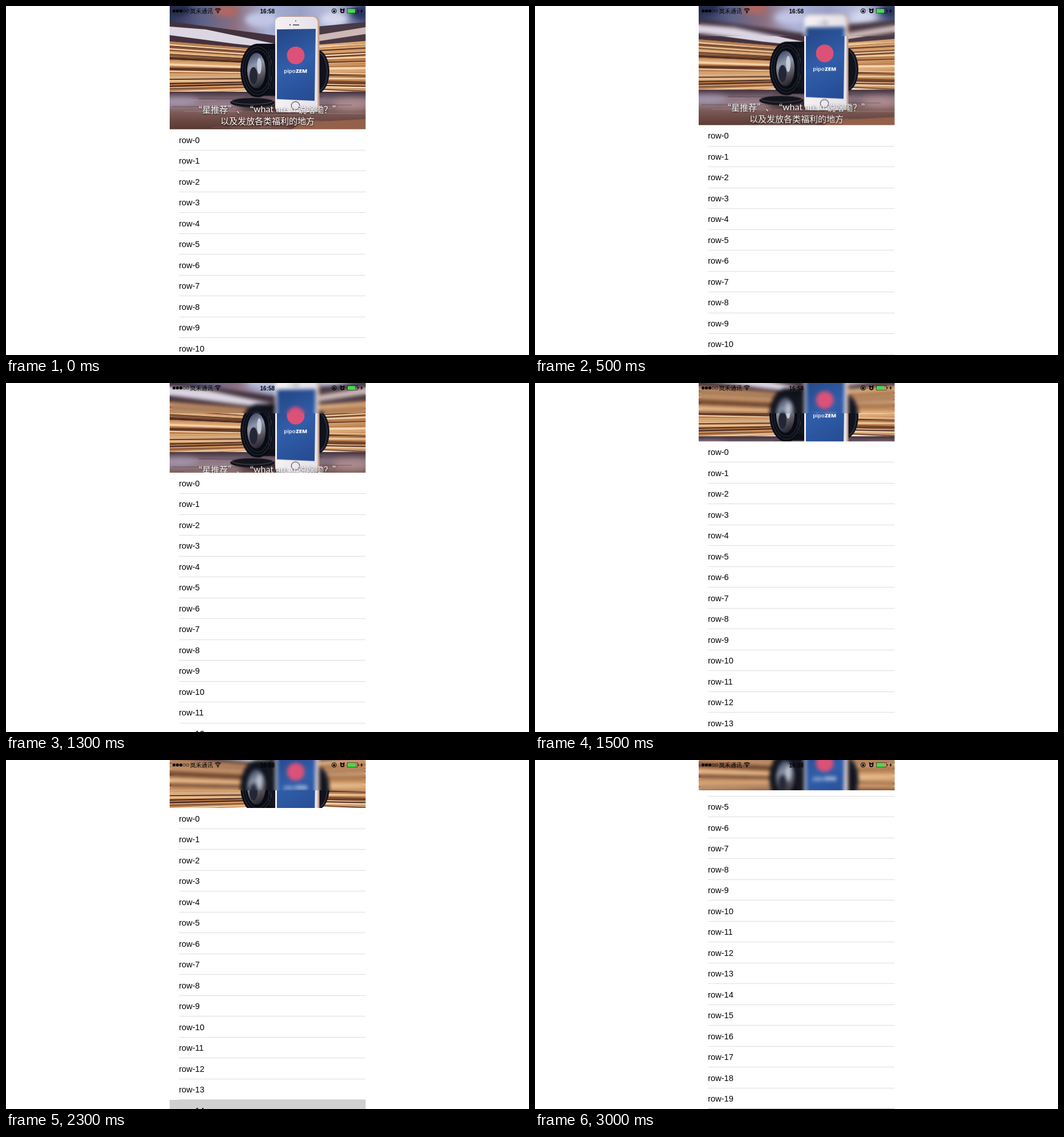
Animation, 917 px wide and 611 px high, one loop 3.5 s. Source, as an HTML page with a canvas:

```html
<!DOCTYPE html>
<html lang="zh-CN">
<head>
<meta charset="utf-8">
<title>Stretchy header list</title>
<style>
  html, body { margin: 0; width: 100%; height: 100%; overflow: hidden; background: #fff; }
  canvas { display: block; }
</style>
</head>
<body>
<canvas id="stage" width="917" height="611"></canvas>
<script>
const ctx = document.getElementById('stage').getContext('2d');
const LEFT = 287, WIDTH = 343.5, HEADER = 215.8, BAR = 53, ROW = 36.5, ROWS = 20;
const STEP = 500, SCROLL = [0, 7.2, 58.7, 113.5, 131.8, 166.2, 334.8];
const PRESSED = { step: 4, row: 14 };
const CJK = '"Noto Sans CJK SC", "Noto Sans CJK", sans-serif';

let seed = 11;
const rand = () => (seed = seed * 16807 % 2147483647) / 2147483647;

function poly(c, fill, ...p) {
  c.fillStyle = fill;
  c.beginPath();
  for (let i = 0; i < p.length; i += 2) c.lineTo(p[i], p[i + 1]);
  c.fill();
}

function oval(c, fill, x, y, rx, ry = rx) {
  c.fillStyle = fill;
  c.beginPath();
  c.ellipse(x, y, rx, ry, 0, 0, 7);
  c.fill();
}

function ring(c, stroke, width, x, y, rx, ry = rx, from = 0, to = 2 * Math.PI) {
  c.strokeStyle = stroke;
  c.lineWidth = width;
  c.beginPath();
  c.ellipse(x, y, rx, ry, 0, from, to);
  c.stroke();
}

function label(c, str, x, y, font, fill, align = 'left') {
  c.font = font;
  c.fillStyle = fill;
  c.textAlign = align;
  c.fillText(str, x, y);
}

function gradient(c, x0, y0, x1, y1, ...colors) {
  const g = c.createLinearGradient(x0, y0, x1, y1);
  colors.forEach((color, i) => g.addColorStop(i / (colors.length - 1), color));
  return g;
}

// Sheets of a paper stack between two slanted edges
function sheets(c, x0, x1, top0, top1, bottom0, bottom1, count) {
  const tints = ['#efc69a', '#d9a06a', '#b87745', '#f5d8b2', '#5f3524', '#dfa973', '#40231e'];
  poly(c, '#bd8657', x0, top0, x1, top1, x1, bottom1, x0, bottom0);
  for (let i = 0; i < count; i++) {
    const k = i / count, h = 1 + rand() * 2.6, shift = rand() * 3 - 1.5;
    const a = top0 + (bottom0 - top0) * k, b = top1 + (bottom1 - top1) * k + shift;
    poly(c, tints[rand() * tints.length | 0], x0, a, x1, b, x1, b + h * 0.8, x0, a + h);
  }
}

function backdrop(c) {
  c.fillStyle = gradient(c, LEFT, 0, 631, 0, '#2d3459', '#5d6288', '#8b6f80', '#a9b0d4', '#99a0c6', '#bcc0dc', '#455080');
  c.fillRect(LEFT, 0, 344, 80);
  c.filter = 'blur(5px)';
  oval(c, '#b4685f', 386, 9, 22, 9);
  oval(c, '#232a4a', 300, 6, 24, 11);
  oval(c, '#c2c6e6', 447, 24, 28, 13);
  oval(c, '#d4d7ee', 575, 23, 24, 11);
  oval(c, '#29345f', 623, 12, 18, 12);
  c.filter = 'none';
  poly(c, '#43323d', 287, 27, 415, 44, 475, 52, 475, 80, 287, 74);
  poly(c, '#dcd6e2', 287, 36, 350, 41, 475, 67, 475, 74, 400, 66, 287, 51);
  poly(c, '#4a3a45', 545, 36, 631, 28, 631, 80, 545, 80);
  poly(c, '#cdb8b6', 545, 51, 631, 37, 631, 49, 545, 62);
  sheets(c, 287, 475, 62, 78, 154, 146, 38);
  sheets(c, 545, 631, 68, 62, 147, 151, 34);

  c.fillStyle = gradient(c, 0, 148, 0, 216, '#3a2a34', '#85707e', '#80625f', '#6d4a45', '#593832');
  c.fillRect(LEFT, 150, 344, 66);
  c.filter = 'blur(6px)';
  oval(c, '#a597af', 305, 168, 34, 8);
  oval(c, '#a18a98', 372, 175, 45, 6);
  oval(c, '#b08d90', 605, 172, 32, 9);
  oval(c, '#3a2628', 470, 176, 62, 8);
  c.filter = 'none';
  c.globalAlpha = 0.3;
  for (let i = 0; i < 26; i++) {
    c.fillStyle = i % 2 ? '#2b1b1e' : '#c09a92';
    c.fillRect(LEFT + rand() * 260, 157 + rand() * 57, 35 + rand() * 110, 0.8 + rand());
  }
  c.globalAlpha = 1;
  poly(c, '#93614a', 520, 204, 631, 198, 631, 216, 500, 216);
}

function camera(c) {
  c.fillStyle = '#0d0f18';
  c.fillRect(441, 66, 60, 91);
  oval(c, '#10121c', 546, 115, 21, 38);
  ring(c, '#2b2f40', 2, 546, 115, 17, 34, -1.3, 1.3);
  oval(c, '#090b13', 441, 113, 30, 47);
  ring(c, '#303441', 1.2, 441, 113, 26, 42);
  ring(c, '#1d202c', 2, 441, 113, 22, 37);
  oval(c, gradient(c, 425, 85, 455, 143, '#3c4560', '#8f98ab', '#554f58', '#131623'), 439, 113, 16, 31);
  oval(c, '#c3cad8', 444, 105, 4, 14);
  oval(c, '#232635', 434, 122, 7, 15);
  c.fillStyle = '#20232f';
  for (let x = 460; x < 473; x += 3) c.fillRect(x, 76, 1, 70);
  oval(c, '#14141d', 432, 169, 39, 8);
  ring(c, '#555260', 1, 432, 166, 36, 6);
}

function phone(c) {
  c.fillStyle = '#c7a18b';
  c.beginPath();
  c.roundRect(474, 18, 75.5, 168, 9);
  c.fill();
  c.fillStyle = gradient(c, 472, 0, 547, 0, '#f5f1f4', '#e5e1e8');
  c.beginPath();
  c.roundRect(472, 19, 74.5, 167, 9);
  c.fill();
  poly(c, gradient(c, 475, 41, 541, 164, '#234583', '#315eaa', '#244b91'), 475, 41, 543, 40, 541, 166, 475, 163);
  c.fillStyle = '#555561';
  c.fillRect(503, 32.3, 11, 1.8);
  oval(c, '#555561', 498, 33, 1.2);
  oval(c, '#555561', 508, 26, 1);
  ring(c, '#675e65', 1.3, 507.5, 174.5, 7.2);
  oval(c, '#dc5178', 508, 86.5, 15.5);
  label(c, 'pipo', 507.5, 116.5, '600 9.5px "Open Sans", sans-serif', '#fff', 'right');
  label(c, 'ZEM', 508, 116.5, '800 9.5px "Open Sans", sans-serif', '#fff');
}

function caption(c) {
  c.shadowColor = '#000c';
  c.shadowBlur = 3;
  c.shadowOffsetY = 1;
  const font = '15px ' + CJK;
  label(c, '“星推荐”、“', 329, 186.5, font, '#fff');
  label(c, 'what are u', 434, 186, '16px Lato, sans-serif', '#fff');
  label(c, '说啥嘞？”', 512, 186.5, font, '#fff');
  label(c, '以及发放各类福利的地方', 458.5, 206.5, font, '#fff', 'center');
  c.shadowColor = 'transparent';
}

function makePhoto() {
  const canvas = document.createElement('canvas');
  canvas.width = 344;
  canvas.height = 216;
  const c = canvas.getContext('2d');
  c.translate(-LEFT, 0);
  [backdrop, camera, phone, caption].forEach(paint => paint(c));
  return canvas;
}

function statusBar() {
  const ink = '#000';
  for (let i = 0; i < 5; i++) {
    const x = 294.7 + i * 5.9;
    if (i < 3) oval(ctx, ink, x, 8.7, 2.6);
    else ring(ctx, ink, 0.6, x, 8.7, 2.3);
  }
  label(ctx, '岚禾通讯', 322.8, 12.6, '10px ' + CJK, ink);
  for (const r of [3, 5.4, 7.6]) ring(ctx, ink, 1.3, 371.5, 12, r, r, -2.3, -0.84);
  oval(ctx, ink, 371.5, 11.5, 1.2);
  label(ctx, '16:58', 458.3, 12.7, 'bold 10px "Liberation Sans", Arial, sans-serif', ink, 'center');

  ring(ctx, ink, 1, 575.3, 8.7, 4);
  ctx.fillStyle = ink;
  ctx.fillRect(573.5, 8, 3.6, 2.8);
  ring(ctx, ink, 0.7, 575.3, 8, 1.2, 1.5, Math.PI, 0);
  ring(ctx, ink, 1.8, 589.8, 9, 2.7);
  oval(ctx, ink, 587, 5.6, 1.3);
  oval(ctx, ink, 592.6, 5.6, 1.3);
  ctx.strokeStyle = ink;
  ctx.lineWidth = 0.5;
  ctx.strokeRect(598.3, 4.7, 18.4, 8);
  ctx.fillRect(617.3, 7.3, 1.2, 2.8);
  ctx.fillStyle = '#42dc4b';
  ctx.fillRect(599, 5.3, 13, 6.8);
  poly(ctx, ink, 624.5, 4.8, 621.2, 9.3, 623.2, 9.3, 622.3, 12.8, 625.8, 7.9, 623.7, 7.9);
}

function list(top, pressed) {
  for (let i = 0; i < ROWS; i++) {
    const y = top + i * ROW;
    if (y < -ROW || y > 611) continue;
    if (i === pressed) {
      ctx.fillStyle = '#d0d0d0';
      ctx.fillRect(LEFT, y, WIDTH, ROW);
    }
    label(ctx, 'row-' + i, 303.2, y + 23.7, '14.6px "Liberation Sans", Arial, sans-serif', '#000');
    ctx.fillStyle = i === ROWS - 1 ? '#b8b8b8' : '#dedee0';
    ctx.fillRect(303.5, Math.round(y + ROW - 0.6), 327, 1);
  }
}

function header(scroll) {
  const travel = Math.min(scroll, HEADER - BAR);
  const y = -travel / 2;
  const clipped = (height, filter) => {
    ctx.save();
    ctx.beginPath();
    ctx.rect(LEFT, 0, WIDTH, height);
    ctx.clip();
    ctx.filter = filter;
    ctx.drawImage(photo, LEFT, y);
    ctx.restore();
  };
  clipped(HEADER - travel, 'none');
  if (scroll > 0) clipped(BAR, 'blur(3px)');
}

const photo = makePhoto();

function draw() {
  const step = Math.floor(performance.now() / STEP) % SCROLL.length;
  const scroll = SCROLL[step];
  ctx.fillStyle = '#fff';
  ctx.fillRect(0, 0, 917, 611);
  list(HEADER - scroll, step === PRESSED.step ? PRESSED.row : -1);
  header(scroll);
  statusBar();
  requestAnimationFrame(draw);
}
draw();
</script>
</body>
</html>
```
